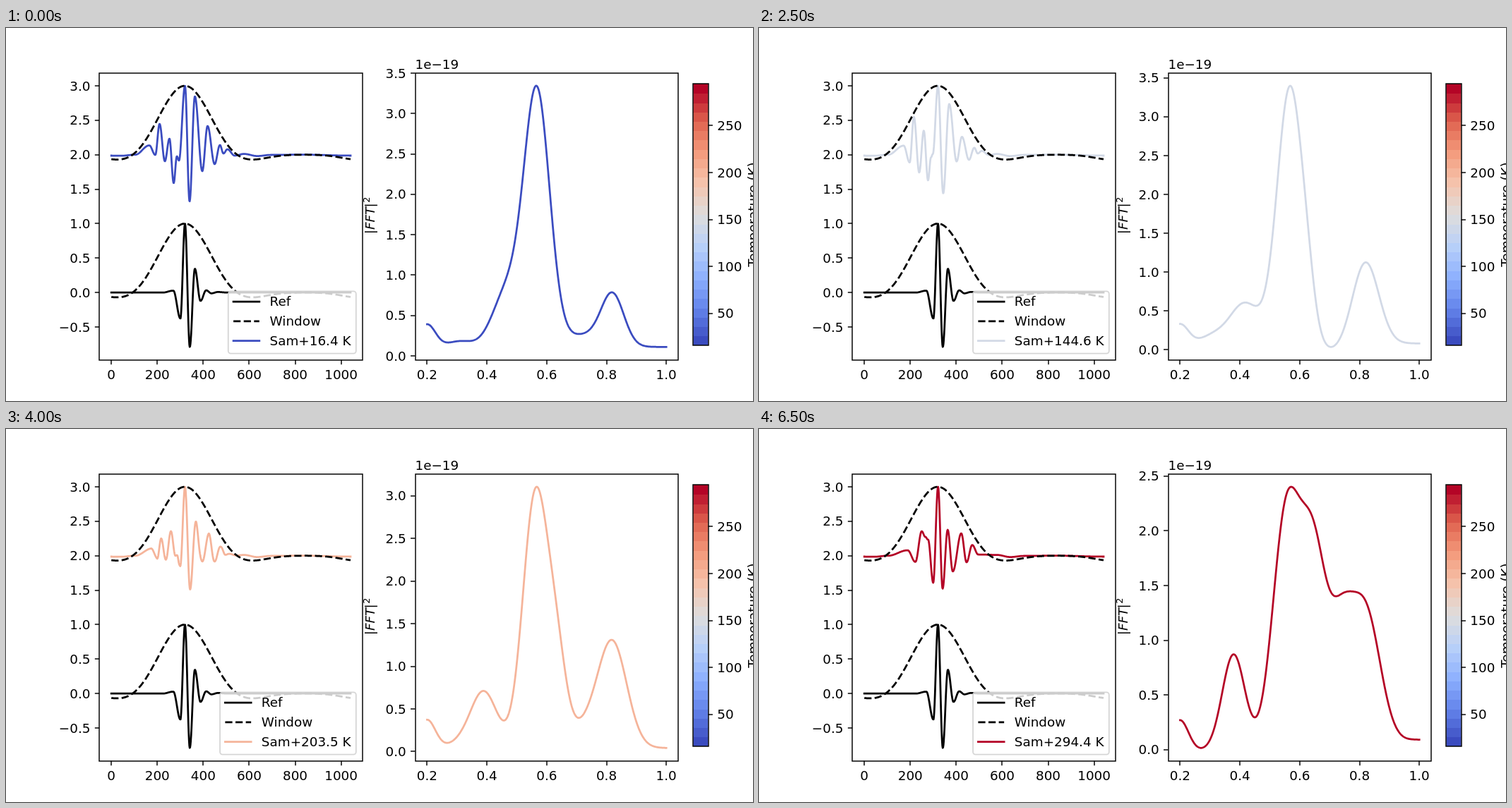
Write an HTML page with a canvas that moves like this. It is 1058 px wide and 529 px high and loops after 7 s.

```html
<!DOCTYPE html>
<html lang="en">
<head>
<meta charset="utf-8">
<title>Spectrum against temperature</title>
<style>
html, body { margin: 0; width: 100%; height: 100%; overflow: hidden; background: #fff; }
canvas { display: block; }
</style>
</head>
<body>
<canvas id="stage" width="1058" height="529"></canvas>
<script>
const ctx = document.getElementById('stage').getContext('2d');
const PT = 1058 / 576, EM = 10 * PT, STEP = 500;
const TOP = 63.5, BOTTOM = 470.8, HIGH = 82, LOW = 452.3;

const temps = [16.4, 46.3, 76.1, 100.2, 123, 144.6, 165, 184.4, 203.5, 222.1, 240.3, 258.4, 276.4, 294.4];
const peaks = [3.343, 3.32, 3.355, 3.31, 3.47, 3.398, 3.59, 3.69, 3.1, 2.456, 2.56, 2.64, 2.56, 2.4];

// Stops are given for the start and end of the cold phase, then of the warm phase
const stopTemps = [16.4, 184.4, 222.1, 294.4];
const clamp = v => Math.min(1, Math.max(0, v));
const lerp = (a, b, u) => a + (b - a) * u;
const progress = (t, i) => clamp((t - stopTemps[i]) / (stopTemps[i + 1] - stopTemps[i]));
function mix(stops, t) {
  if (!Array.isArray(stops)) return stops;
  const i = t < stopTemps[1] ? 0 : t < stopTemps[2] ? 1 : 2;
  return lerp(stops[i], stops[i + 1], progress(t, i));
}

// The spectrum is a sum of bell curves whose parameters drift with temperature
const bumps = [
  { at: .2, width: .028, height: [.28, .24, .42, .28] },
  { at: .31, width: .04, height: [.07, .1, 0, 0] },
  { at: [.467, .4, .379, .379], width: [.048, .05, .038, .038], height: [.67, .47, .85, .88] },
  { at: [.627, .627, .637, .647], width: [.024, .024, .042, .043], height: [0, .4, 1.5, 1.72] },
  { at: [.72, .715, .742, .738], width: [.06, .06, .041, .04], height: [.14, -.18, .6, .92] },
  { at: .82, width: [.038, .046, .05, .05], height: [.64, 1.2, 1.25, 1.25] },
  { at: 1, width: .08, height: [0, 0, 0, .1] },
];
const main = { at: [.567, .568, .556, .556], width: [.043, .043, .04, .046] };
const crest = [.566, .568, .572, .574];
const base = [.11, .07, .014, -.01];

const bell = (bump, t) => {
  const at = mix(bump.at, t), width = mix(bump.width, t);
  return f => Math.exp(-(((f - at) / width) ** 2) / 2);
};

function spectrum(step) {
  const t = temps[step], floor = mix(base, t), top = mix(crest, t);
  const parts = bumps.map(b => [mix(b.height, t), bell(b, t)]);
  const rest = f => parts.reduce((sum, [h, g]) => sum + h * g(f), floor);
  const peak = bell(main, t), height = (peaks[step] - rest(top)) / peak(top);
  return f => Math.max(.008, rest(f) + height * peak(f));
}

// Eases from one turning point to the next
function swing(points) {
  return x => {
    const i = Math.min(points.length - 1, Math.max(1, points.findIndex(p => p[0] >= x)));
    const [x0, y0] = points[i - 1], [x1, y1] = points[i];
    return lerp(y0, y1, (1 - Math.cos(Math.PI * clamp((x - x0) / (x1 - x0)))) / 2);
  };
}

// Turning points: x, then y at the start and at the end of the phase
const coldTurns = [[203, 166.5, 167], [211.5, 180, 194], [217.5, 136, 123], [225, 189, 210],
  [231.5, 157, 142], [237.5, 220, 215], [242, 182, 184], [245, 188, 176], [253.5, 82, 82],
  [260, 246, 231], [267.5, 97, 111], [278, 203, 185], [285.5, 139, 159], [295.5, 193, 185],
  [303, 166, 171], [308, 178, 178], [313.5, 172, 175], [324, 181, 180]];
const warmTurns = [[211, 171, 172], [222, 188, 188.5], [231, 142, 145], [236, 152, 153],
  [240, 145.5, 157], [247, 213, 218], [253.6, 82, 82], [260.3, 226, 226.5], [267.7, 142, 143],
  [275, 211, 202], [287, 137, 148], [294.5, 196, 189], [302.5, 160, 164.5], [311, 179, 178]];
const before = [[149.2, 181], [163, 181.2], [183, 179.7]];
const after = [[337, 178.6], [356, 181.6], [375, 180], [420, 179.6], [488, 181]];

function phaseTrace(turns, u, drift) {
  const shift = x => drift * u * clamp(Math.abs(x - 253.5) / 14);
  return swing([...before, ...turns.map(([x, a, b]) => [x + shift(x), lerp(a, b, u)]), ...after]);
}

function trace(t) {
  const cold = phaseTrace(coldTurns, progress(t, 0), 2.5);
  const warm = phaseTrace(warmTurns, progress(t, 2), -.5);
  const u = progress(t, 1);
  return x => lerp(cold(x), warm(x), u);
}

const pulse = swing([[149.2, 375.1], [222, 375.2], [237, 372.5], [247, 412], [253.5, 277.4],
  [260.3, 452.3], [267.5, 341.5], [275.5, 387], [283.5, 372], [291, 376.3], [300, 374.4], [312, 375.1],
  [488, 375.1]]);

// Flat-top window, rolled so that it peaks with the pulse
const flatTop = [.2156, .4166, .2773, .0836, .00695];
const leftX = v => 149.2 + v * .3254;
const leftY = v => HIGH + (3 - v) * 97.7;
const windowAt = offset => x => {
  const phi = 2 * Math.PI * (x - leftX(320)) / (1042 * .3254);
  return leftY(flatTop.reduce((sum, a, k) => sum + a * Math.cos(k * phi), offset));
};

const palette = [[59, 76, 192], [98, 130, 234], [141, 176, 254], [184, 208, 249], [221, 221, 221],
  [245, 196, 173], [244, 154, 123], [222, 96, 77], [180, 4, 38]];
function coolwarm(u) {
  const p = u * 8, i = Math.min(7, Math.floor(p));
  return `rgb(${palette[i].map((c, j) => Math.round(lerp(c, palette[i + 1][j], p - i)))})`;
}

function line(points, color = '#000', width = 1.5 * PT, dashed = false) {
  ctx.strokeStyle = color;
  ctx.lineWidth = width;
  ctx.lineCap = dashed || width < 2 ? 'butt' : 'square';
  ctx.lineJoin = 'round';
  ctx.setLineDash(dashed ? [5.55 * PT, 2.4 * PT] : []);
  ctx.beginPath();
  points.forEach(([x, y]) => ctx.lineTo(x, y));
  ctx.stroke();
}

function plot(f, from, to, color, dashed) {
  const points = [];
  for (let x = from; x < to; x += .5) points.push([x, f(x)]);
  points.push([to, f(to)]);
  line(points, color, 1.5 * PT, dashed);
}

function text(str, x, y, align = 'left', size = EM, style = '') {
  ctx.font = `${style} ${size}px "DejaVu Sans", sans-serif`;
  ctx.textAlign = align;
  ctx.fillStyle = '#000';
  ctx.fillText(str, x, y);
}

function frame(...edges) {
  const [x, y, right, bottom] = edges.map(Math.round);
  ctx.setLineDash([]);
  ctx.strokeStyle = '#000';
  ctx.lineWidth = .8 * PT;
  ctx.lineJoin = 'miter';
  ctx.strokeRect(x, y, right - x, bottom - y);
}

function tickX(x, label) {
  const px = Math.round(x);
  line([[px, BOTTOM], [px, BOTTOM + 3.5 * PT]], '#000', .8 * PT);
  text(label, x, 498, 'center');
}

function tickY(edge, y, label, side = -1) {
  const py = Math.round(y);
  line([[edge, py], [edge + side * 3.5 * PT, py]], '#000', .8 * PT);
  text(label, edge + side * 7 * PT, y + 6.6, side < 0 ? 'right' : 'left');
}

function rotated(x, y, draw) {
  ctx.save();
  ctx.translate(x, y);
  ctx.rotate(-Math.PI / 2);
  draw();
  ctx.restore();
}

function legend(label, color) {
  ctx.font = `${EM}px "DejaVu Sans", sans-serif`;
  const right = 495.8, textX = right - .4 * EM - ctx.measureText(label).width;
  const handle = textX - 2.8 * EM, left = handle - .4 * EM;
  ctx.setLineDash([]);
  ctx.beginPath();
  ctx.roundRect(left, 373.3, right - left, 88.3, .2 * EM);
  ctx.fillStyle = 'rgba(255,255,255,.8)';
  ctx.fill();
  ctx.strokeStyle = 'rgba(204,204,204,.8)';
  ctx.lineWidth = PT;
  ctx.stroke();
  [['Ref', '#000'], ['Window', '#000', true], [label, color]].forEach(([name, c, dashed], i) => {
    const y = 388.1 + i * 27.8;
    line([[handle, y], [handle + 2 * EM, y]], c, 1.5 * PT, dashed);
    text(name, textX, y + 6.3);
  });
}

function leftPlot(step, color) {
  const from = leftX(0), to = 488;
  plot(pulse, from, to, '#000');
  plot(windowAt(0), from, to, '#000', true);
  plot(trace(temps[step]), from, to, color);
  plot(windowAt(2), from, to, '#000', true);
  frame(132.25, TOP, 504.95, BOTTOM);
  for (let v = 0; v <= 1000; v += 200) tickX(leftX(v), v);
  for (let v = -.5; v <= 3; v += .5) tickY(132.25, leftY(v), v.toFixed(1).replace('-', '\u2212'));
  legend(`Sam+${temps[step].toFixed(1)} K`, color);
}

function rightPlot(step, color) {
  const left = 579.5, from = 596.4, to = 935.2, perUnit = (to - from) / .8;
  const value = spectrum(step);
  const samples = Array.from({ length: 401 }, (_, i) => value(.2 + i / 500));
  const lo = Math.min(...samples), hi = Math.max(...samples);
  const toY = v => LOW - (v - lo) / (hi - lo) * (LOW - HIGH);
  plot(x => toY(value(.2 + (x - from) / perUnit)), from, to, color);
  frame(left, TOP, 952.2, BOTTOM);
  for (let i = 1; i <= 5; i++) tickX(from + (i - 1) * perUnit / 5, (i / 5).toFixed(1));
  for (let v = 0; toY(v) >= TOP; v += .5) tickY(left, toY(v), v.toFixed(1));
  text('1e\u221219', left, 58);
  rotated(522, 292.3, () => {
    text('|', 0, 0);
    text('FFT', .337 * EM, 0, 'left', EM, 'italic');
    text('|', 2.062 * EM, 0);
    text('2', 2.42 * EM, -7.5, 'left', .7 * EM);
  });
}

function colorbar() {
  const x = 973.4, right = 994.5, top = 79.35, bottom = 449.65, bands = 28;
  const h = (bottom - top) / bands;
  for (let i = 0; i < bands; i++) {
    ctx.fillStyle = coolwarm(i / (bands - 1));
    ctx.fillRect(x, Math.round(bottom - (i + 1) * h), right - x, Math.ceil(h));
  }
  frame(x, top, right, bottom);
  for (let t = 50; t <= 250; t += 50)
    tickY(right, bottom - (t - 16.4) / 278 * (bottom - top), t, 1);
  rotated(1063.5, 264.5, () => text('Temperature (K)', 0, 0, 'center'));
}

function draw() {
  const step = Math.floor(performance.now() / STEP) % temps.length;
  const color = coolwarm((temps[step] - 16.4) / 278);
  ctx.fillStyle = '#fff';
  ctx.fillRect(0, 0, 1058, 529);
  leftPlot(step, color);
  rightPlot(step, color);
  colorbar();
  requestAnimationFrame(draw);
}
draw();
</script>
</body>
</html>
```
